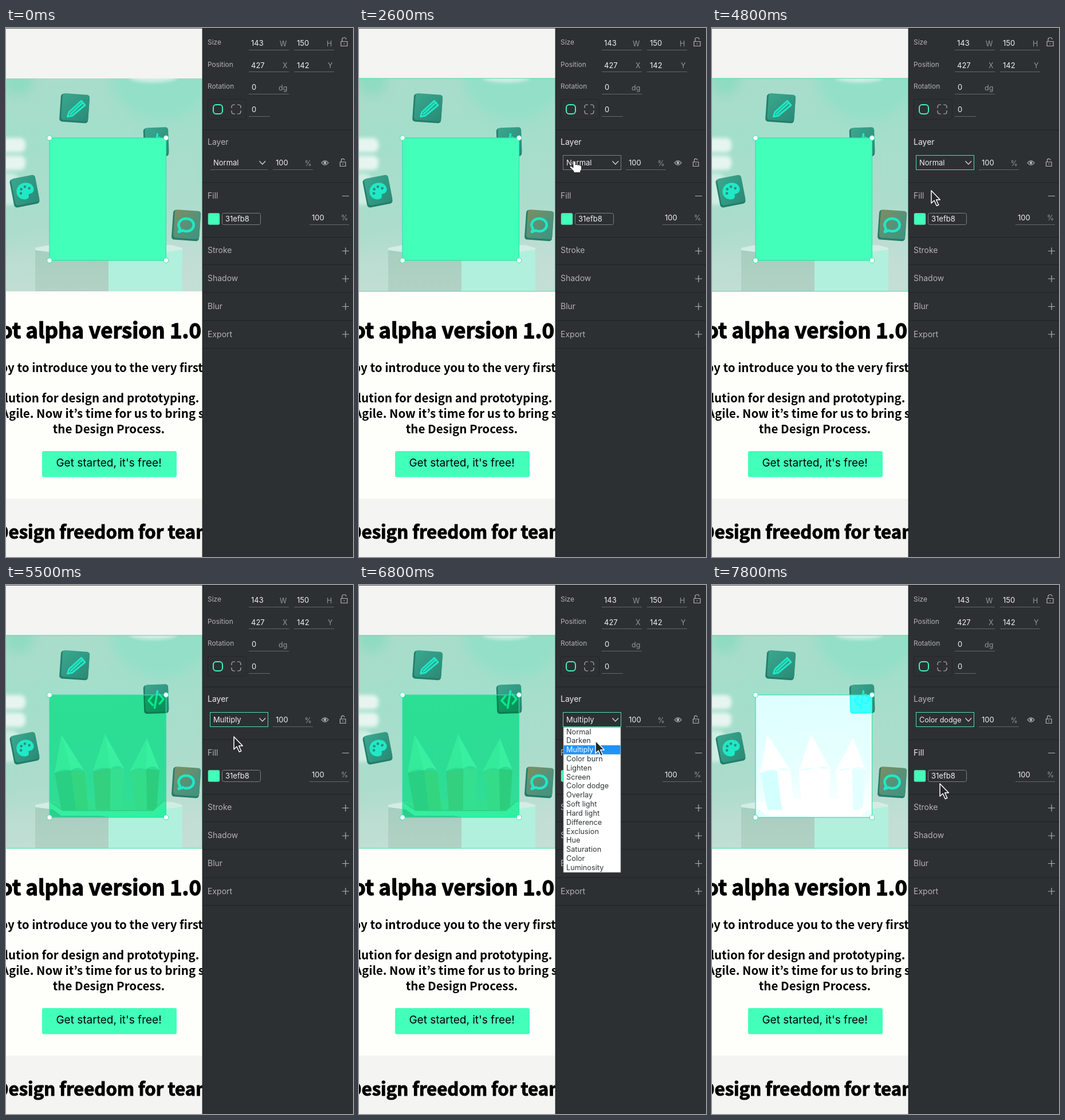
An HTML page for the animation above (8 s loop, 606 by 924 pixels).

```html
<!DOCTYPE html>
<html lang="en">
<head>
<meta charset="utf-8">
<title>Blend modes</title>
<style>
  html, body { margin: 0; width: 100%; height: 100%; overflow: hidden; background: #2d3032; }
  svg { display: block; width: 606px; height: 924px; font: 13px Inter, "Open Sans", sans-serif; }
  .head text { font: 700 20.5px "Noto Sans CJK JP", "Noto Sans CJK SC", "Noto Sans", sans-serif; }
  .head .big { font-size: 36.6px; stroke: #000; stroke-width: 1.3px; }
  .head .mid { font-size: 31.2px; stroke: #000; stroke-width: 1.1px; }
  .icon { fill: none; stroke: #1fe9c6; stroke-width: 3.6; stroke-linejoin: round; stroke-linecap: round; }
  .line { fill: none; stroke: #b1b2b5; stroke-width: 1.2; }
  #list text { font-size: 12.7px; }
</style>
</head>
<body>
<svg viewBox="0 0 606 924">
  <defs>
    <linearGradient id="wall" x2="0.15" y2="1">
      <stop offset="0" stop-color="#abdccb"/><stop offset=".3" stop-color="#a3dfcb"/>
      <stop offset=".7" stop-color="#acdccc"/><stop offset="1" stop-color="#c4dfd5"/>
    </linearGradient>
    <linearGradient id="teal" x2="1" y2="1">
      <stop offset="0" stop-color="#3ba78e"/><stop offset="1" stop-color="#298a76"/>
    </linearGradient>
    <linearGradient id="olive" x2="1" y2="1">
      <stop offset="0" stop-color="#7f8e60"/><stop offset=".55" stop-color="#55917a"/><stop offset="1" stop-color="#3d947e"/>
    </linearGradient>
    <linearGradient id="front" y2="1" x2="0">
      <stop offset="0" stop-color="#a6cfc0"/><stop offset="1" stop-color="#b3d1c6"/>
    </linearGradient>
    <filter id="soft" x="-50%" y="-50%" width="200%" height="200%"><feGaussianBlur stdDeviation="3"/></filter>
    <filter id="haze" x="-50%" y="-50%" width="200%" height="200%"><feGaussianBlur stdDeviation="10"/></filter>
    <clipPath id="frame"><rect y="88" width="343" height="372"/></clipPath>
  </defs>

  <rect width="343" height="924" fill="#f4f4f2"/>
  <rect y="460" width="343" height="362" fill="#fefefb"/>

  <g clip-path="url(#frame)">
    <rect y="88" width="343" height="372" fill="url(#wall)"/>
    <g filter="url(#haze)">
      <circle cx="270" cy="70" r="90" fill="#93dfc7"/>
      <circle cx="22" cy="92" r="26" fill="#8ddbc1"/>
      <ellipse cx="130" cy="420" rx="190" ry="30" fill="#bfded3" opacity=".6"/>
    </g>
    <g filter="url(#soft)" fill="#e6f5ef">
      <ellipse cx="257" cy="86" rx="42" ry="9" fill="#d3efe5"/>
      <rect x="-20" y="192" width="54" height="25" rx="9"/>
      <rect x="-20" y="223" width="54" height="25" rx="9"/>
      <rect x="-20" y="254" width="42" height="55" rx="12" fill="#cfeee3"/>
    </g>
    <path d="M51 384L76 379H290L308 384V406H51Z" fill="#d3ede4"/>
    <path d="M51 388L179 405V460H51Z" fill="url(#front)"/>
    <path d="M179 405L308 387V460H179Z" fill="#b1f0dd"/>
    <path d="M80 381L110 373H250L275 380L258 398H98Z" fill="#c0dfc6"/>
    <g id="pencils"></g>
    <path d="M78 384L98 399H258L276 382" fill="none" stroke="#c9efdc" stroke-width="8"/>
    <path d="M78 379L99 394H257L275 377" fill="none" stroke="#c0d3b8" stroke-width="2"/>
    <g id="cards"></g>
  </g>

  <rect id="hover" x="-5" y="88" width="348" height="372" fill="none" stroke="#45dcae"/>
  <rect id="shape" x="76" y="192" width="203.5" height="214" fill="#42ffba"/>
  <rect x="76" y="192" width="203.5" height="214" fill="none" stroke="#31e3ad" stroke-width="1.2"/>
  <g id="handles" fill="#fff" stroke="#31e3ad"></g>

  <g class="head">
    <text class="big" x="341" y="542" text-anchor="end">ot alpha version 1.0</text>
    <text x="344" y="601" text-anchor="end">happy to introduce you to the very first</text>
    <text x="337.500" y="654" text-anchor="end">solution for design and prototyping.</text>
    <text x="346" y="681" text-anchor="end">Agile. Now it’s time for us to bring s</text>
    <text x="179.5" y="708" text-anchor="middle">the Design Process.</text>
    <text class="mid" x="179.5" y="892" text-anchor="middle">Design freedom for teams</text>
  </g>
  <rect x="63" y="739" width="235" height="45.500" rx="3" fill="#42ffba"/>
  <text x="179.5" y="766" font-size="19" text-anchor="middle">Get started, it's free!</text>

  <rect x="343" width="263" height="924" fill="#2d3032"/>
  <path d="M0 .5H606M343 .5V924" stroke="#1d1f20" opacity=".75"/>
  <path d="M343 178H606M343 270H606M343 365.500H606M343 413.500H606M343 462H606M343 511H606M343 559.500H606" stroke="#1f2123"/>
  <path d="M424 38.500h70m9 0h70M424 76.500h70m9 0h70M424 115.500h70M424 154.500h37M466 247.500h70M530 343.500h69" stroke="#63676b"/>
  <g id="labels"></g>

  <rect x="352.500" y="124.500" width="67" height="35" rx="4" fill="none" stroke="#232527"/>
  <rect x="362" y="134" width="16" height="16" rx="5" fill="none" stroke="#42f0b9" stroke-width="2"/>
  <path class="line" d="M394 140v-2q0-4 4-4h2m4 0h2q4 0 4 4v2m0 4v2q0 4-4 4h-2m-4 0h-2q-4 0-4-4v-2"/>
  <g class="line">
    <path d="M585 23.500h11v8h-11zM587 23.500v-3a3.500 3.500 0 0 1 7-.5M590.500 26.500v2"/>
    <path d="M583.500 234h9.500v7.500h-9.500zM585.500 234v-2.500a2.800 2.800 0 0 1 5.600-.5M588.300 236.500v2"/>
    <path d="M551 235.500q6-7.500 12 0q-6 7.500-12 0z"/>
    <circle cx="557" cy="235.500" r="1.800" fill="#b1b2b5"/>
    <path id="signs"/>
  </g>

  <path d="M357 247.500h100" stroke="#63676b"/>
  <rect id="select" x="356.500" y="222.500" width="101" height="25" fill="none"/>
  <text id="value" x="362" y="239.700" fill="#eceded"></text>
  <path d="M442.500 232.500l5.300 5.500l5.300-5.500" fill="none" stroke="#d5d6d7" stroke-width="1.300"/>

  <rect x="353" y="323.500" width="20" height="20" rx="2" fill="#42ffba" stroke="#78b9a2" stroke-width=".6"/>
  <rect x="377.500" y="323.500" width="67" height="20" rx="3" fill="none" stroke="#7b7e81"/>

  <g id="list">
    <rect x="357" y="248.500" width="100" height="253.500" fill="#fff" stroke="#8b8d8f" stroke-width=".7"/>
    <rect id="mark" x="357.500" width="99" height="15.830" fill="#2093f7"/>
  </g>

  <path id="arrow" d="M0 0V22L5 17.300L9.300 26.500L12.800 25L8.600 16H15.300Z" fill="#242628" stroke="#fff" stroke-width="1.500" stroke-linejoin="round"/>
  <path id="hand" d="M1 1.500Q3-1 5 1.500V7Q7 5.500 9 7.300Q11 6 12.500 8Q15 7 15.500 10V14Q15 17 13.500 18V20.500H2V18L-5 11Q-4.500 8-1.500 10L1 12Z" fill="#fff" stroke="#222" stroke-width=".9"/>
</svg>

<script>
const $ = id => document.getElementById(id);
const add = (id, markup) => $(id).insertAdjacentHTML("beforeend", markup);
const show = (id, on) => $(id).setAttribute("visibility", on ? "visible" : "hidden");
const ROW = 15.83, LIST_TOP = 248.3;
const MODES = ["Normal", "Darken", "Multiply", "Color burn", "Lighten", "Screen", "Color dodge", "Overlay",
  "Soft light", "Hard light", "Difference", "Exclusion", "Hue", "Saturation", "Color", "Luminosity"];

// Text is placed by its vertical centre.
function label(x, y, text, size, fill, id = "") {
  add("labels", `<text id="${id}" x="${x}" y="${y + size * .36}" font-size="${size}" fill="${fill}">${text}</text>`);
}
const DIM = "#b1b2b5", LIT = "#e9eaea", UNIT = "#94979a";
[["Size", 25], ["Position", 64], ["Rotation", 102]].forEach(([s, y]) => label(352, y, s, 11.9, DIM));
[["Layer", 199], ["Fill", 292.5], ["Stroke", 388], ["Shadow", 437], ["Blur", 485.5], ["Export", 534.5]]
  .forEach(([s, y]) => label(352, y, s, 14, DIM, s));
[[428, 26, 143], [508, 26, 150], [428, 65, 427], [508, 65, 142], [429, 103.5, 0], [429, 142, 0],
 [471, 235.5, 100], [534, 331, 100], [383, 333, "31efb8"]].forEach(([x, y, s]) => label(x, y, s, 13, "#f0f1f1"));
[[478, 27, "W"], [560, 27, "H"], [483, 65.5, "X"], [562, 65.5, "Y"], [476, 104, "dg"], [521.5, 236, "%"], [585, 331, "%"]]
  .forEach(([x, y, s]) => label(x, y, s, 12.5, UNIT));
$("signs").setAttribute("d", "M587 293.5h12" +
  [389.5, 438, 486.5, 535].map(y => `M587 ${y}h12m-6-6v12`).join(""));

for (const x of [76, 279.5]) for (const y of [192, 406])
  add("handles", `<circle cx="${x}" cy="${y}" r="4.3"/>`);

function pencil(tipX, tipY, left, right, y, footL, footR, fillL, fillR) {
  const mid = left + (right - left) * .55, foot = footL + (footR - footL) * .55;
  add("pencils", `<path d="M${left} ${y}L${mid} ${y - 5}L${foot} 395H${footL}Z" fill="${fillL}"/>
    <path d="M${mid} ${y - 5}L${right} ${y - 3}L${footR} 395H${foot}Z" fill="${fillR}"/>
    <path d="M${tipX} ${tipY}L${right} ${y - 3}Q${(mid + right) / 2} ${y - 14} ${mid} ${y - 4}Q${(mid + left) / 2} ${y - 10} ${left} ${y}Z" fill="#d6f0dc"/>
    <path d="M${tipX} ${tipY}L${mid} ${y - 4}Q${(mid + left) / 2} ${y - 10} ${left} ${y}Z" fill="#c8ead4"/>`);
}
pencil(97, 262, 85, 137, 328, 97, 144, "#9dd0b4", "#c2d6ae");
pencil(173, 261, 152, 207, 325, 157, 202, "#bfd0ae", "#c6e0c4");
pencil(246, 268, 216, 268, 326, 226, 263, "#c3dcbc", "#a8ceac");

function card(x, y, w, h, turn, fill, icon) {
  const box = `x="${-w / 2}" y="${-h / 2}" width="${w}" height="${h}" rx="5"`;
  add("cards", `<g transform="translate(${x} ${y}) rotate(${turn})">
    <rect ${box} fill="#237d6b"/><rect ${box} fill="url(#${fill})" transform="translate(1.5 -2) scale(.95)"/>
    <g class="icon">${icon}</g></g>`);
}
card(119.5, 140.5, 50, 49, 4, "teal",
  `<path d="M-11 15L-9 7L11-14L18-7L-3 13ZM-6 10L13-10" stroke-width="3"/>`);
card(262, 199.5, 43, 50, -2, "teal", `<path d="M-6-6L-13 2L-6 10M6-8L13 0L6 8M3-14L-3 15"/>`);
card(32.5, 285.5, 45, 50, -11, "teal",
  `<path d="M1 12C-17 13-17-13 2-13C17-13 19 5 7 4C1 4 7 11 1 12Z" fill="#1fe9c6"/>
   <path d="M-7 2h.1M-5-5h.1M2-8h.1M9-4h.1" stroke="#2b8f7a" stroke-width="4.500"/>`);
card(314.5, 345, 48, 52, 4, "olive",
  `<path d="M-10 7C-18-3-9-12 0-12C18-12 17 10 0 10Q-3 10-5 9L-12 12Z" stroke-width="4.500"/>`);

MODES.forEach((m, i) => add("list", `<text x="362" y="${LIST_TOP + ROW * (i + .5) + 4.3}">${m}</text>`));
const rows = $("list").querySelectorAll("text");

// Pointer path: time, x, y
const PATH = [[600, 170, 84], [700, 180, 170], [800, 188, 236], [900, 192, 259], [1000, 192, 259], [1100, 195, 262],
  [1900, 195, 262], [2000, 215, 257], [2200, 310, 238], [2300, 339, 233], [2400, 339, 233], [2500, 360, 232],
  [2600, 373, 232], [3700, 373, 232], [3800, 373, 238], [4400, 382, 281], [4500, 383, 284], [5200, 383, 284],
  [5500, 398, 265], [6000, 413, 237], [6500, 413, 236], [6600, 413, 239], [6700, 413, 247], [6800, 413, 272],
  [7300, 399, 343.5], [7400, 397.5, 344], [7500, 398, 347], [8000, 398, 347]];

function pointer(t) {
  const i = Math.max(1, PATH.findIndex(p => p[0] >= t));
  const [a, b] = [PATH[i - 1], PATH[i]], k = (t - a[0]) / (b[0] - a[0]);
  return [a[1] + (b[1] - a[1]) * k, a[2] + (b[2] - a[2]) * k];
}

function draw(ms) {
  const t = Math.floor(ms / 100) * 100;
  const [x, y] = pointer(Math.max(600, t));
  const mode = t < 5000 ? 0 : t < 7800 ? 2 : 6;
  const open = t >= 3200 && t < 4800 || t >= 6100 && t < 7800;
  const overSelect = !open && x > 356 && y > 222 && y < 248;
  const focus = t >= 3200;

  show("hover", t >= 600 && t < 800 || t >= 2200);
  $("shape").style.mixBlendMode = MODES[mode].toLowerCase().replace(" ", "-");
  $("value").textContent = MODES[mode];
  $("value").setAttribute("font-size", mode === 6 ? 12.6 : 13);
  $("select").setAttribute("stroke", focus ? "#4fe0b2" : overSelect ? "#7b7f82" : "none");
  $("Layer").setAttribute("fill", t >= 2300 && t < 7800 ? LIT : DIM);
  $("Fill").setAttribute("fill", t >= 7800 ? LIT : DIM);

  show("list", open);
  $("list").setAttribute("opacity", t === 4700 ? .4 : 1);
  // The highlight trails the pointer by one step.
  const row = Math.floor((pointer(Math.max(600, t - 100))[1] - LIST_TOP) / ROW);
  const active = row < 0 ? mode : row;
  $("mark").setAttribute("y", LIST_TOP + ROW * active);
  rows.forEach((r, i) => r.setAttribute("fill", i === active ? "#fff" : "#303436"));

  show("arrow", t >= 600 && !overSelect);
  show("hand", t >= 600 && overSelect);
  for (const id of ["arrow", "hand"]) $(id).setAttribute("transform", `translate(${x} ${y})`);
}

const start = performance.now();
function tick() {
  draw((performance.now() - start) % 8000);
  requestAnimationFrame(tick);
}
tick();
</script>
</body>
</html>
```
